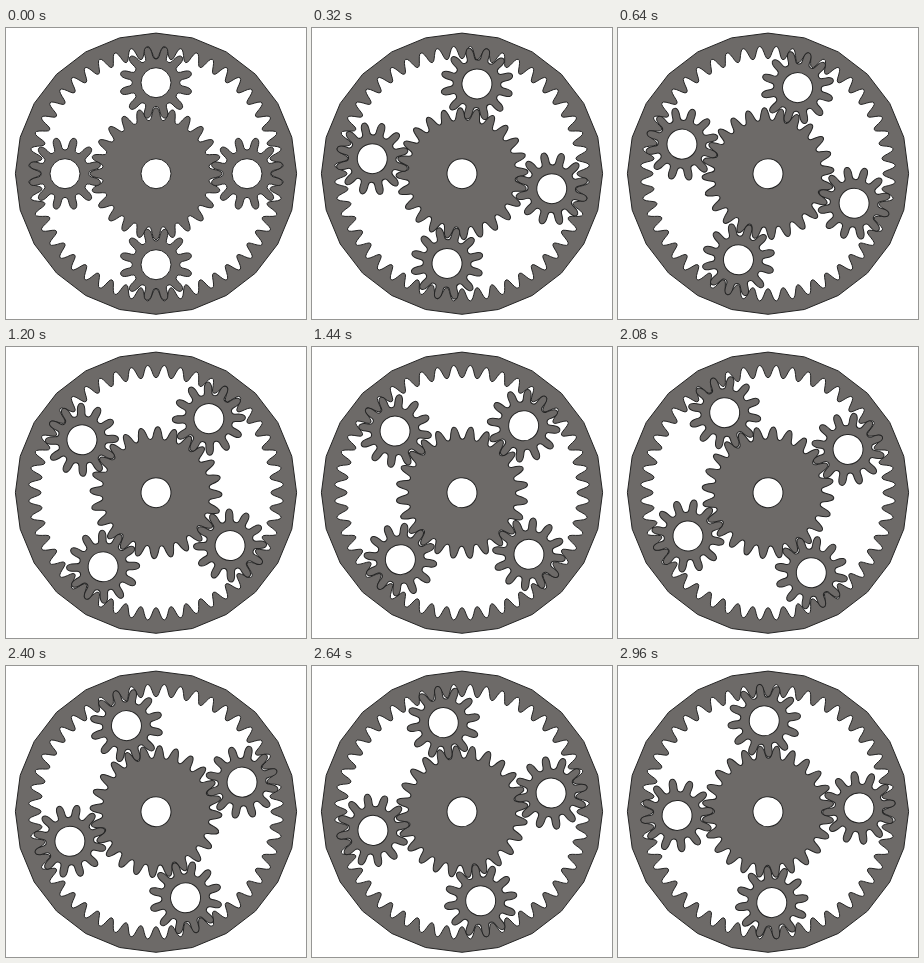
These frames come from a looping animation (300 by 291 pixels, 3.04 s). An HTML page:

```html
<!DOCTYPE html>
<html lang="en">
<head>
<meta charset="utf-8">
<title>Planetary gears</title>
<style>
  html, body { margin: 0; width: 100%; height: 100%; overflow: hidden; background: #fff; }
  svg { display: block; width: 100%; height: 100%; }
  path { fill: #6d6a68; fill-rule: evenodd; stroke: #242424; stroke-width: 1; stroke-linejoin: round; }
</style>
</head>
<body>
<svg viewBox="0 0 300 291"><g id="train" transform="translate(150 145.7)"></g></svg>
<script>
const LOOP = 3040, STEP = 80, ORBIT = 91;
const train = document.getElementById('train');

const polar = (angle, r) => [r * Math.sin(angle), -r * Math.cos(angle)];
const text = p => p.map(v => v.toFixed(2)).join(' ');
const middle = (p, q) => [(p[0] + q[0]) / 2, (p[1] + q[1]) / 2];

// Each flank point is [half width of the tooth, radius], from root to tip.
function toothedPath(teeth, flank, phase = 0) {
  const points = [];
  for (let i = 0; i < teeth; i++) {
    const axis = (i + phase) * 2 * Math.PI / teeth;
    for (const [w, r] of flank) points.push(polar(axis - w / r, r));
    for (const [w, r] of [...flank].reverse()) points.push(polar(axis + w / r, r));
  }
  const start = middle(points[points.length - 1], points[0]);
  return `M${text(start)}` + points.map((p, i) =>
    `Q${text(p)} ${text(middle(p, points[(i + 1) % points.length]))}`).join('') + 'Z';
}

function polygonPath(sides, r) {
  const corners = Array.from({ length: sides }, (_, i) =>
    text(polar(i * 2 * Math.PI / sides, r)));
  return `M${corners.join('L')}Z`;
}

const holePath = r => `M${-r} 0A${r} ${r} 0 1 0 ${r} 0A${r} ${r} 0 1 0 ${-r} 0Z`;

function addPart(d) {
  const part = document.createElementNS('http://www.w3.org/2000/svg', 'path');
  part.setAttribute('d', d);
  train.append(part);
  return part;
}

addPart(polygonPath(24, 140.6) + toothedPath(48, [[6.7, 127.5], [4, 121.5], [1.7, 115]]));
const sun = addPart(
  toothedPath(24, [[5, 53.5], [4, 60], [1.9, 66]]) + holePath(15));
const planetPath =
  toothedPath(12, [[3.6, 23.8], [3.8, 29.5], [3.5, 33.5], [1.7, 36.6]], 0.5) + holePath(15);
const planets = [0, 90, 180, 270].map(home => ({ home, part: addPart(planetPath) }));

// The ring stands still, so the tooth ratios 48 : 24 : 12 set every turn.
function render(time) {
  const frame = Math.floor(time % LOOP / STEP);
  const carrier = 90 * frame * STEP / LOOP;
  sun.setAttribute('transform', `rotate(${3 * carrier})`);
  for (const { home, part } of planets) {
    part.setAttribute('transform',
      `rotate(${home + carrier}) translate(0 ${-ORBIT}) rotate(${-4 * carrier})`);
  }
}

const origin = performance.now();
function tick() {
  render(performance.now() - origin);
  requestAnimationFrame(tick);
}
tick();
</script>
</body>
</html>
```
